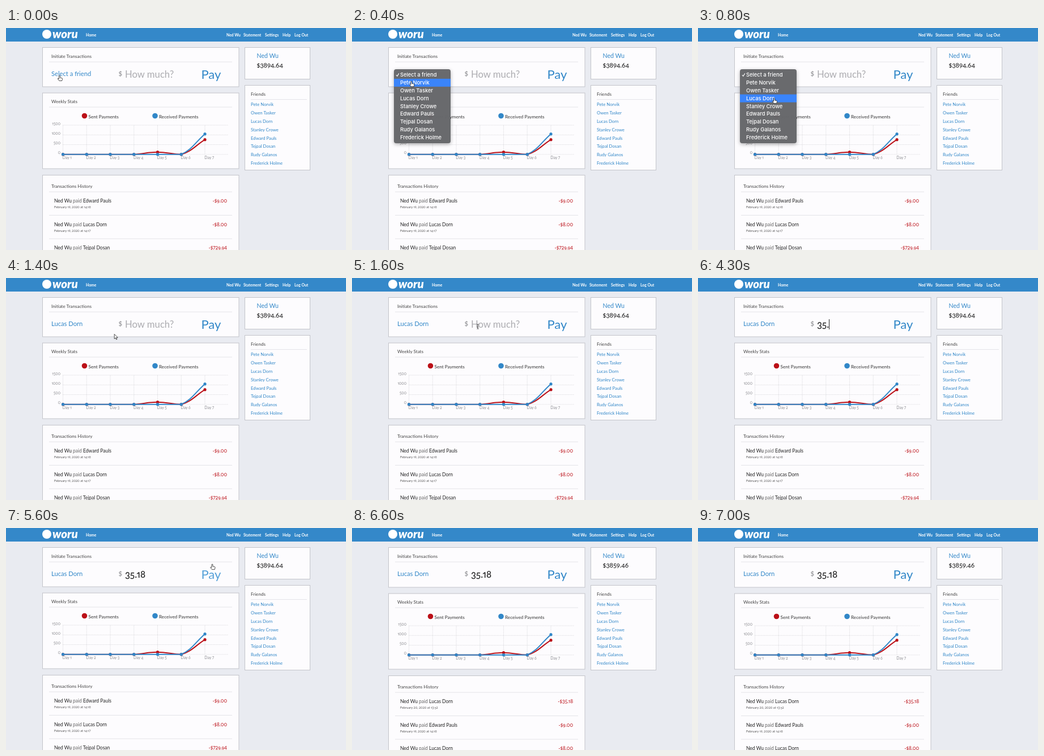
An HTML page that plays this animation: 600x393 px, repeating every 7.6 s.

```html
<!DOCTYPE html>
<html lang="en">
<head>
<meta charset="utf-8">
<title>Payments dashboard</title>
<style>
html, body { margin: 0; width: 100%; height: 100%; overflow: hidden; background: #e9ebf1; }
svg { display: block; width: 600px; height: 393px; font-family: Lato, sans-serif; font-variant-numeric: oldstyle-nums proportional-nums; }
text { white-space: pre; }
.panel { fill: #fdfcfe; stroke: #c3c4ca; }
.rule { stroke: #e4e4e8; }
.head { font-size: 8.1px; fill: #444; }
.nav { font-size: 6.8px; font-weight: 700; fill: #fff; }
.blue { fill: #3187c8; }
.axis { font-size: 6.8px; fill: #8c8c90; }
.grid { stroke: #d4d4d8; stroke-width: .7; stroke-dasharray: 1.5 1; }
.menu { filter: drop-shadow(0 2px 3px rgba(0, 0, 0, .3)); }
.menu text { font: 500 9.3px Inter, sans-serif; fill: #fff; }
</style>
</head>
<body>
<svg id="stage" viewBox="0 0 600 393"></svg>
<script>
const LOOP = 7600;
const BLUE = '#3187c8', RED = '#bb1018';
const OWNER = 'Ned Wu';
const FRIENDS = ['Pete Norvik', 'Owen Tasker', 'Lucas Dorn', 'Stanley Crowe',
  'Edward Pauls', 'Tejpal Dosan', 'Rudy Galanos', 'Frederick Holme'];
const PROMPT = 'Select a friend';
const PICK = 2;
const HISTORY = [
  [FRIENDS[PICK], 'February 20, 2020 at 13:52', '-$35.18'],
  [FRIENDS[4], 'February 19, 2020 at 14:18', '-$9.00'],
  [FRIENDS[2], 'February 19, 2020 at 14:17', '-$8.00'],
  [FRIENDS[5], 'February 19, 2020 at 14:16', '-$729.94']
];

const text = (x, y, s, attrs = '') => `<text x="${x}" y="${y}" ${attrs}>${s}</text>`;
const panel = (x, y, w, h, attrs = '') =>
  `<rect class="panel" x="${x}" y="${y}" width="${w}" height="${h}" ${attrs}/>`;
const rule = (x1, x2, y) => `<path class="rule" d="M${x1} ${y}H${x2}"/>`;
const size = (px, fill) => `font-size="${px}" fill="${fill}"`;

// chart
const dayX = i => 100.5 + i * 41.75;
const BASE = 223.7, TENSION = .4;

// control points before and after point i, kept above the base line
function handles(pts, i) {
  const p = pts[i], a = pts[i - 1] || p, b = pts[i + 1] || p;
  const before = Math.hypot(p[0] - a[0], p[1] - a[1]);
  const after = Math.hypot(b[0] - p[0], b[1] - p[1]);
  const at = k => {
    const f = TENSION * k / (before + after);
    return [p[0] + f * (b[0] - a[0]), Math.min(BASE, p[1] + f * (b[1] - a[1]))];
  };
  return [at(-before), at(after)];
}

function series(values, color) {
  const pts = values.map((v, i) => [dayX(i), BASE - v]);
  let d = `M${pts[0]}`;
  for (let i = 1; i < pts.length; i++) {
    d += `C${handles(pts, i - 1)[1]} ${handles(pts, i)[0]} ${pts[i]}`;
  }
  return `<path d="${d}" fill="none" stroke="${color}" stroke-width="2"/>` +
    pts.map(([x, y]) => `<circle cx="${x}" cy="${y}" r="2.6" fill="${color}"/>`).join('');
}

function chart() {
  let s = '';
  for (let i = 0; i < 4; i++) {
    const y = 172 + i * 17.25;
    s += `<path class="grid" d="M100 ${y}H392"/>` +
      text(96, y - .3, 1500 - i * 500, 'class="axis" text-anchor="end"');
  }
  for (let i = 0; i < 7; i++) {
    s += `<path class="grid" d="M${dayX(i)} 172V224"/>` +
      text(dayX(i) - .7, 231.5, `Day ${i + 1}`, 'class="axis"');
  }
  return s + series([0, 0, 0, 0, 4, 0, 26], RED) + series([0, 0, 0, 0, 0, 0, 36], BLUE);
}

const legend = (x, color, label) =>
  `<circle cx="${x}" cy="155.5" r="4.8" fill="${color}"/>` + text(x + 7, 159.5, label, size(8.2, '#333'));

const historyRow = ([name, date, sum], i) => {
  const y = 309.3 + i * 41.5;
  return text(85, y, `${OWNER}<tspan fill="#666"> paid </tspan>${name}`, size(8.5, '#222')) +
    text(85, y + 10, date, size(5.7, '#555')) +
    text(390, y, sum, size(8.8, RED) + ' text-anchor="end"') +
    rule(76, 399, y + 22.2);
};

// menu
const ROW = 13.85, MENU_Y = 76;
const menu = () =>
  `<rect x="74" y="73" width="100" height="131" rx="4" fill="#68696c" fill-opacity=".98"/>
   <rect id="mark" x="74" width="100" height="14" fill="#3a84fa"/>
   <path d="M78 83.2l1.8 2.2 3-5" fill="none" stroke="#fff" stroke-width="1.1"/>` +
  [PROMPT, ...FRIENDS].map((s, i) => text(85, MENU_Y + i * ROW + 10.2, s)).join('');

const nav = [[389, OWNER], [419, 'Statement'], [457, 'Settings'], [488, 'Help'], [509, 'Log Out'], [141, 'Home']];

stage.innerHTML = `
  <rect width="600" height="393" fill="#e9ebf1"/>
  <rect width="600" height="24" fill="#3488c9"/>
  <circle cx="72" cy="11" r="8" fill="#fff"/>
  ${text(82, 18, 'woru', 'font-size="20.5" font-weight="900" font-style="italic" fill="#fff"')}
  ${nav.map(([x, s]) => text(x, 14.6, s, 'class="nav"')).join('')}
  ${panel(64.5, 34.5, 346.5, 69.5, 'id="pay-panel"')}
  ${text(80, 53, 'Initiate Transactions', 'class="head"')}
  ${rule(76, 399, 60)}
  ${text(80, 85.2, '', `id="friend" font-size="11.2" fill="${BLUE}"`)}
  ${text(198.5, 84.8, '$', size(13, '#8c8c90'))}
  ${text(210, 87.5, '', 'id="amount" font-size="16.7"')}
  <path id="caret" d="M0 73V91" stroke="#222"/>
  ${text(344.5, 90, 'Pay', 'id="pay" font-size="22"')}
  <g id="lower">
    ${panel(64.5, 115, 346.5, 134)}
    ${text(80, 132.9, 'Weekly Stats', 'class="head"')}
    ${rule(76, 399, 140)}
    ${legend(138.5, RED, 'Sent Payments')}
    ${legend(263, BLUE, 'Received Payments')}
    ${chart()}
    ${panel(64.5, 260.5, 346.5, 160)}
    ${text(80, 283, 'Transactions History', 'class="head"')}
    ${rule(76, 399, 290)}
    <g id="before">${HISTORY.slice(1).map(historyRow).join('')}</g>
    <g id="after">${HISTORY.slice(0, 3).map(historyRow).join('')}</g>
  </g>
  ${panel(421.5, 34.5, 115, 56)}
  ${text(442.5, 52.7, OWNER, 'class="blue" font-size="10.6"')}
  ${text(442.5, 70, '', 'id="balance" font-size="11.6" fill="#111"')}
  ${panel(421.5, 101.5, 115, 150)}
  ${text(432, 119.8, 'Friends', 'class="head"')}
  ${rule(432, 531, 126.5)}
  ${FRIENDS.map((s, i) => text(432, 137.7 + i * 14.95, s, 'class="blue" font-size="7.75"')).join('')}
  <g id="menu" class="menu">${menu()}</g>
  <g id="cursor" stroke="#222" stroke-width=".8" stroke-linejoin="round" fill="#fff">
    <path id="hand" d="M-1 .6Q0-.6 1 .6V4L4.6 4.8Q5.2 5.2 5 6.4L4.2 9.4H-.6L-3.4 5.8Q-3.2 4.4-1 6Z"/>
    <path id="arrow" d="M0 0V8.4L2 6.6 3.4 9.6 4.7 9 3.4 6.1H6Z"/>
    <path id="beam" fill="none" d="M-1.6-4.2Q0-4.2 0-3.2Q0-4.2 1.6-4.2M0-3.2V3.2M-1.6 4.2Q0 4.2 0 3.2Q0 4.2 1.6 4.2M-1 1H1"/>
  </g>`;

const el = id => document.getElementById(id);
const show = (id, on) => { el(id).style.display = on ? '' : 'none'; };

// [time, x, y]
const PATHS = [
  [[0, 94.5, 84], [200, 94.5, 84], [800, 134.5, 124]],
  [[800, 134.5, 124], [1100, 134.5, 124], [1600, 222, 86], [2000, 222, 86]],
  [[5200, 300, 82], [5600, 364, 64], [5900, 362, 74], [6500, 362, 74]]
];
// [time, amount, caret visible]
const TYPING = [[0, null, 0], [1700, '', 1], [2500, '3', 1], [2900, '35', 1], [3600, '35', 0],
  [3900, '35', 1], [4200, '35.', 1], [4600, '35.1', 1], [4800, '35.18', 1], [5200, '35.18', 0]];

function pointer(t) {
  const path = PATHS.find(p => t >= p[0][0] && t < p[p.length - 1][0]);
  if (!path) return null;
  const i = path.findIndex(k => k[0] > t);
  const [t0, x0, y0] = path[i - 1], [t1, x1, y1] = path[i];
  const u = (t - t0) / (t1 - t0), e = u * u * (3 - 2 * u);
  return [x0 + (x1 - x0) * e, y0 + (y1 - y0) * e];
}

function draw(t) {
  const paid = t >= 6500;
  const pos = pointer(t);
  show('cursor', pos);
  if (pos) {
    const kind = t < 1200 || pos[0] > 340 ? 'hand' : pos[0] > 205 ? 'beam' : 'arrow';
    ['hand', 'arrow', 'beam'].forEach(k => show(k, k === kind));
    el('cursor').setAttribute('transform', `translate(${pos})`);
  }

  const open = t >= 200 && t < 1300;
  show('menu', open);
  if (open) {
    el('menu').style.opacity = Math.min(1, (1300 - t) / 200);
    const row = Math.max(0, Math.floor((pos[1] + 1 - MENU_Y) / ROW));
    el('mark').setAttribute('y', MENU_Y + row * ROW);
  }
  el('friend').textContent = t < 1100 ? PROMPT : FRIENDS[PICK];

  const [, value, caretOn] = TYPING.filter(k => k[0] <= t).pop();
  const amount = el('amount');
  amount.textContent = value === null ? 'How much?' : value;
  amount.setAttribute('fill', value === null ? '#acacb0' : '#111');
  show('caret', caretOn);
  if (caretOn) {
    const end = value ? amount.getComputedTextLength() : 0;
    el('caret').setAttribute('transform', `translate(${Math.round(210 + end) + .5})`);
  }

  el('pay').setAttribute('fill', pos && pos[0] > 340 ? '#55a0d8' : BLUE);
  el('balance').textContent = paid ? '$3859.46' : '$3894.64';
  el('pay-panel').setAttribute('height', paid ? 70.5 : 69.5);
  el('lower').setAttribute('transform', `translate(0 ${paid ? 1 : 0})`);
  show('before', !paid);
  show('after', paid);
}

const start = performance.now();
function tick() {
  const t = (performance.now() - start) % LOOP;
  draw(Math.floor(t / 100) * 100);
  requestAnimationFrame(tick);
}
tick();
</script>
</body>
</html>
```
